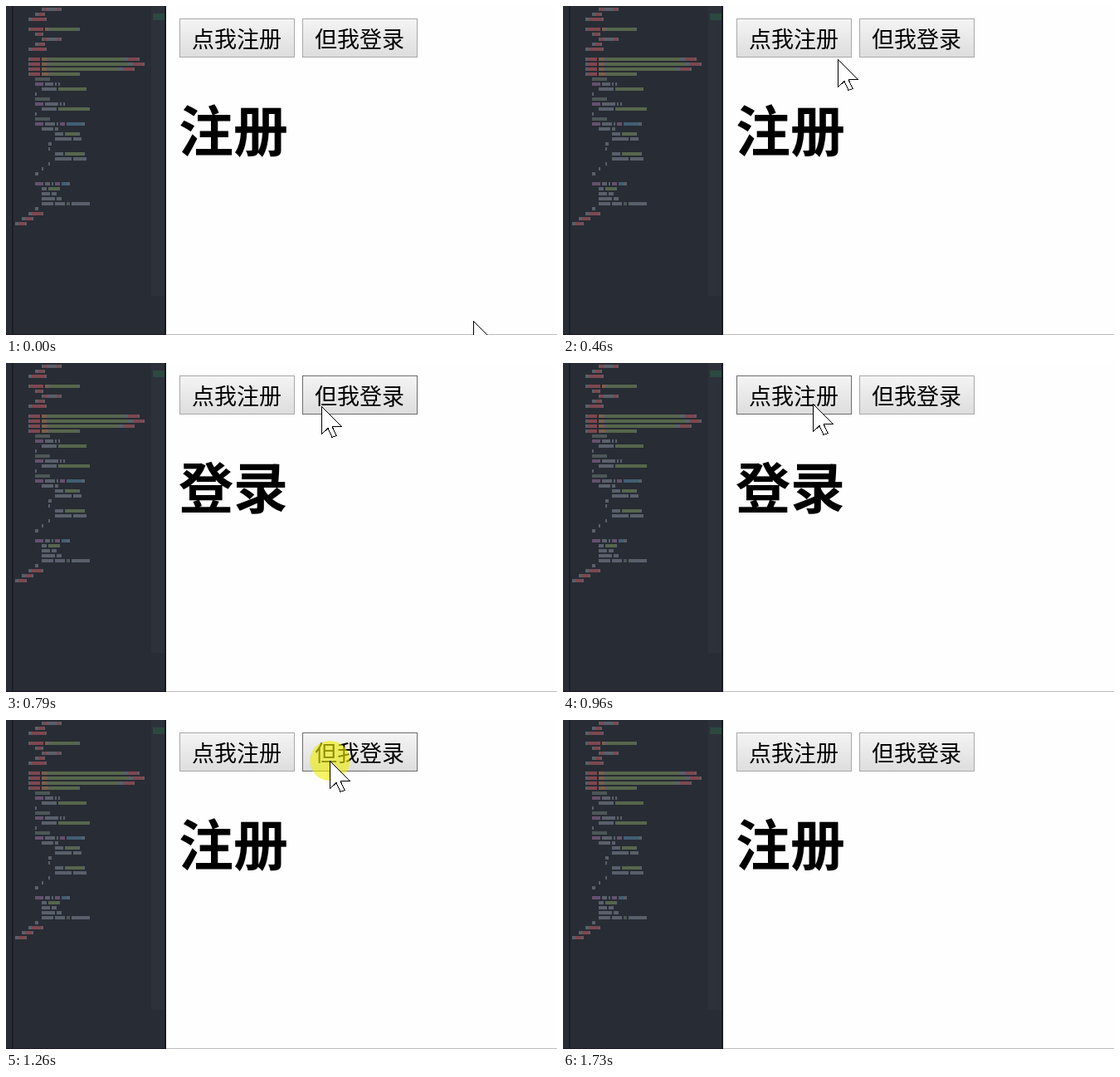
These frames come from a looping animation (664x396 px, 2140 ms). An HTML page:

```html
<!DOCTYPE html>
<html lang="zh-CN">
<head>
<meta charset="utf-8">
<title>注册 / 登录</title>
<style>
  html, body { margin: 0; width: 100%; height: 100%; overflow: hidden; background: #fefefe; }
  svg { display: block; position: absolute; left: 0; top: 0; }
  text { font-family: "Noto Sans CJK SC", "Noto Sans CJK", "Noto Sans", sans-serif; fill: #000; }
  .button rect { fill: url(#face); stroke: #a8a8a8; }
  .button.hover rect { stroke: #6c6c6c; }
  .button text { font-size: 27px; }
  #heading { font-size: 66px; font-weight: 700; }
  #minimap { fill: #59606b; }
  .string { fill: #56664c; }
  .comment { fill: #4c5657; }
  .keyword { fill: #66506f; }
  .type { fill: #405f74; }
  .tag { fill: #7e474f; }
  .attr { fill: #7a6048; }
</style>
</head>
<body>
<svg width="664" height="396" viewBox="0 0 664 396">
  <defs>
    <linearGradient id="face" x2="0" y2="1">
      <stop offset="0" stop-color="#f4f4f4"/>
      <stop offset="1" stop-color="#ddd"/>
    </linearGradient>
  </defs>

  <rect width="664" height="396" fill="#fefefe"/>
  <path d="M193 395.5H664" stroke="#bdbdbd"/>

  <g shape-rendering="crispEdges">
    <rect width="193" height="396" fill="#282c34"/>
    <rect x="175" width="16" height="349" fill="#2c313a"/>
    <rect x="177" y="9" width="14" height="8" fill="#2c493f"/>
    <rect x="7" width="2" height="396" fill="#1b1e24"/>
    <rect x="191" width="2" height="396" fill="#181a1f"/>
    <rect y="395" width="193" height="1" fill="#21182a"/>
    <g id="minimap"></g>
  </g>

  <g class="button">
    <rect x="209.5" y="15.5" width="138" height="46"/>
    <text x="224" y="49.5">点我注册</text>
  </g>
  <g class="button">
    <rect x="357.5" y="15.5" width="138" height="46"/>
    <text x="372" y="49.5">但我登录</text>
  </g>
  <text id="heading" x="208" y="175">注册</text>

  <g id="pointer">
    <circle id="press" r="24" fill="#eeee00" fill-opacity=".6"/>
    <path d="M.5 .5V33.5L8 26.5L13 37.5L18 35.5L13.2 24.5H24.5Z" fill="#fff" stroke="#000" shape-rendering="crispEdges"/>
  </g>
</svg>
<script>
const $ = id => document.getElementById(id);

// Code shown in the editor overview, one small bar per token.
const code = `        <h1>Log</h1>
      </div>
    </template>

    <template id="register-panels">
      <div>
        <h1>Reg</h1>
      </div>
    </template>

    <assets key="node_modules/vue/dist/vue.runtime.common.js"></assets>
    <assets key="node_modules/vue-router/dist/vue-router.min.js"></assets>
    <assets key="node_modules/axios/dist/axios.runtime.js"></assets>
    <assets lang="text/javascript">
      //1.panel
      const Login = {
        template: '#login-template'
      }
      //2.panel
      const Register = {
        template: '#register-account'
      }
      //3.route
      const router = new VueRouter({
        routes: [{
            path: '/login',
            component: Login
          },
          {
            path: '/register',
            component: Register
          }
        ]
      })

      const app = new Vue({
        el: '#app',
        data: {},
        methods: {},
        router: router // use-routing
      })
    </assets>
  </body>
</html>`;

const token = new RegExp([
  /(?<string>(['"]).*?\2)/, /(?<comment>\/\/\S*)/, /(?<keyword>\b(const|new)\b)/,
  /(?<type>\bVue\w*)/, /(?<tag>(?<=<\/?)\w+)/, /(?<attr>\w+(?==))/, /\w+|\S/
].map(part => part.source).join('|'), 'g');

function drawLine(line, row) {
  const indent = line.search(/\S/);
  return [...line.matchAll(token)].map(({ 0: text, index, groups }) => {
    const kind = Object.keys(groups).find(name => groups[name]) || 'plain';
    const x = 11 + 2 * (indent + index);
    return `<rect class="${kind}" x="${x}" y="${2 + 6 * row}" width="${2 * text.length}" height="4"/>`;
  }).join('');
}
$('minimap').innerHTML = code.split('\n').map(drawLine).join('');

const LOOP = 2140, STEP = 78.8, LEAD = 8, LAST = 21;
const stops = [
  { at: 0, x: 563, y: 379 },
  { at: 4, x: 352, y: 77 },
  { at: 6, x: 310, y: 50, click: true },
  { at: 8, x: 404, y: 55 },
  { at: 9, x: 408, y: 53, click: true },
  { at: 12, x: 301, y: 49 },
  { at: 13, x: 314, y: 49, click: true },
  { at: 14, x: 324, y: 49 },
  { at: 16, x: 390, y: 49, click: true },
  { at: 18, x: 330, y: 48, click: true },
  { at: LAST, x: 570, y: 246 }
];
const buttons = [...document.querySelectorAll('.button')].map((node, i) => ({
  node, left: 209 + 148 * i, title: ['注册', '登录'][i]
}));

const ease = u => u * u * (3 - 2 * u);
const covers = ({ left }, { x, y }) => x >= left && x < left + 139 && y >= 15 && y < 62;

function pointerAt(step) {
  const next = stops.find(stop => stop.at >= step);
  const prev = stops.findLast(stop => stop.at <= step);
  if (next === prev) return next;
  const u = ease((step - prev.at) / (next.at - prev.at));
  const mix = axis => Math.round(prev[axis] + (next[axis] - prev[axis]) * u);
  return { x: mix('x'), y: mix('y') };
}

function draw(time) {
  const step = Math.floor((time + LEAD) / STEP);
  const visible = step <= LAST;
  const pointer = pointerAt(Math.min(step, LAST));
  $('pointer').style.display = visible ? '' : 'none';
  $('pointer').setAttribute('transform', `translate(${pointer.x} ${pointer.y})`);
  $('press').style.display = pointer.click ? '' : 'none';
  for (const button of buttons) {
    button.node.classList.toggle('hover', visible && covers(button, pointer));
  }
  // A click takes effect on release, one step later.
  const clicked = stops.findLast(stop => stop.click && stop.at < step);
  const active = clicked && buttons.find(button => covers(button, clicked));
  $('heading').textContent = (active || buttons[0]).title;
}

const start = performance.now();
function tick() {
  draw((performance.now() - start) % LOOP);
  requestAnimationFrame(tick);
}
tick();
</script>
</body>
</html>
```
